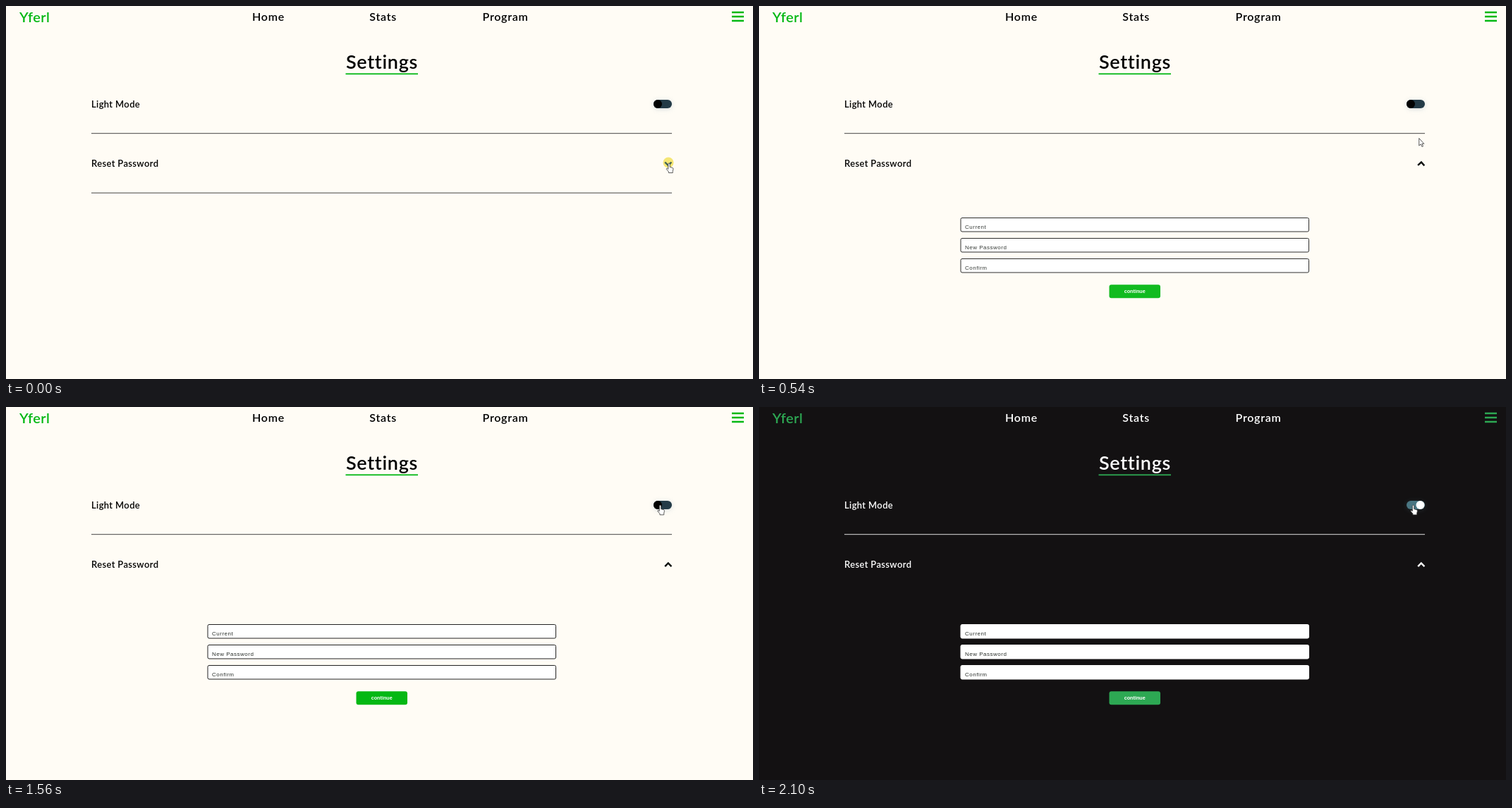
Write an HTML page that moves like this. It is 1059 px wide and 529 px high and loops after 3.48 s.

```html
<!DOCTYPE html>
<html lang="en">
<head>
<meta charset="utf-8">
<title>Settings</title>
<style>
  html, body { margin: 0; width: 100%; height: 100%; overflow: hidden; }
  svg {
    --bg: #fffcf5; --ink: #000; --accent: #04b814; --line: #444; --border: #222;
    display: block; width: 1059px; height: 529px; background: var(--bg);
    font: 600 13px Lato, sans-serif; letter-spacing: .35px;
  }
  svg.dark {
    --bg: #131112; --ink: #fff; --accent: #2da853; --line: #ddd; --border: #fff;
  }
  text { fill: var(--ink); white-space: pre; }
  .nav { font-size: 16px; letter-spacing: .75px; }
  .title { font-size: 27px; letter-spacing: .7px; }
  #logo { font-size: 20px; }
  .accent { fill: var(--accent); }
  .line { stroke: var(--line); }
  .field rect { fill: #fff; stroke: var(--border); }
  .field text { font: 8px "Liberation Sans", Arial, sans-serif; letter-spacing: .5px; fill: #2b302c; }
  .button { font: bold 7.2px "Liberation Sans", Arial, sans-serif; letter-spacing: 0; fill: #fff; }
  #chevron { fill: none; stroke-width: 2.4; }
  #cursor path { fill: #fff; stroke: #333; stroke-width: .8; stroke-linejoin: round; }
</style>
</head>
<body>
<svg id="stage" viewBox="0 0 1059 529">
  <defs><filter id="blur" x="-50%" y="-100%" width="200%" height="300%"><feGaussianBlur stdDeviation="3.5"/></filter></defs>

  <text id="logo" x="19" y="23">Yferl</text>
  <g class="nav">
    <text x="349" y="20.5">Home</text>
    <text x="515.3" y="20.5">Stats</text>
    <text x="675.5" y="20.5">Program</text>
  </g>
  <path class="accent" d="M1029 7.8h17v2.4h-17zm0 6h17v2.4h-17zm0 6h17v2.4h-17z"/>

  <text class="title" x="482" y="89">Settings</text>
  <rect class="accent" x="481.5" y="95.4" width="102.5" height="1.8"/>

  <text x="121" y="144">Light Mode</text>
  <path class="line" d="M121 180.7H944"/>
  <text x="121" y="228">Reset Password</text>
  <path id="lowerLine" class="line" d="M121 265.1H944"/>

  <rect id="glow" x="918" y="134" width="26" height="12" rx="6" filter="url(#blur)"/>
  <rect id="track" x="918" y="133" width="26" height="12" rx="6"/>
  <circle id="knob" cy="139" r="6"/>

  <g id="form">
    <g id="fields"></g>
    <rect class="accent" x="496.5" y="403.3" width="72.5" height="19" rx="3"/>
    <text class="button" x="532.7" y="415.2" text-anchor="middle">continue</text>
  </g>

  <circle id="click" cx="-1" cy="-1" r="7.5" fill="#f2df4a" opacity=".75"/>
  <path id="chevron" d="M-4.6 -2.3L0 2.3L4.6 -2.3"/>
  <g id="cursor">
    <path id="arrow" d="M0 0V10.5L2.4 8.4L4.2 12L5.8 11.3L4.1 7.8H7.1Z"/>
    <path id="hand" d="M-1.2 1.2a1.2 1.2 0 012.4 0V5.4L4.8 6.4q1.3.4 1.1 1.8L5.2 11.5V13.6H-.6V12L-3.6 8.6q-.3-1.5 1-1.4L-1.2 8.4Z"/>
  </g>
</svg>
<script>
const LOOP = 3480, OPEN_AT = 110, DARK_AT = 1610;
const $ = id => document.getElementById(id);

$('fields').innerHTML = ['Current', 'New Password', 'Confirm'].map((label, i) => `
  <g class="field" transform="translate(286 ${Math.round(308 + i * 28.8)})">
    <rect x="0" y=".5" width="493.5" height="19.5" rx="2"/>
    <text x="6" y="15.5">${label}</text>
  </g>`).join('');

// time, x, y of the pointer tip
const pointerPath = [
  [0, 940, 223], [300, 939.5, 221], [420, 938.5, 209], [660, 933, 166.5],
  [780, 931, 156], [1030, 929, 145], [1190, 929, 145], [1260, 927.5, 139.3],
];

const phase = (t, start, length) => Math.min(1, Math.max(0, (t - start) / length));
const mix = (a, b, p) => a + (b - a) * p;
const smooth = p => p * p * (3 - 2 * p);
const easeOut = p => 1 - (1 - p) ** 2;
const mixColor = (a, b, p) => `rgb(${a.map((v, i) => Math.round(mix(v, b[i], p)))})`;
const show = (id, on) => $(id).setAttribute('visibility', on ? 'visible' : 'hidden');

function pointerAt(t) {
  const next = pointerPath.findIndex(key => key[0] > t);
  if (next < 0) return pointerPath.at(-1).slice(1);
  const [t0, x0, y0] = pointerPath[next - 1], [t1, x1, y1] = pointerPath[next];
  const p = (t - t0) / (t1 - t0);
  return [mix(x0, x1, p), mix(y0, y1, p)];
}

function drawForm(t) {
  const progress = phase(t, OPEN_AT, 500), open = smooth(progress);
  $('form').setAttribute('transform', `translate(0 ${Math.round(-161 * (1 - open))})`);
  $('form').setAttribute('opacity', open);
  show('lowerLine', t < OPEN_AT);

  $('chevron').setAttribute('transform', `translate(938.8 223.8) rotate(${-180 * easeOut(progress)})`);
  const hover = 1 - phase(t, 420, 120);
  $('chevron').style.stroke = t < DARK_AT ? mixColor([8, 12, 10], [62, 98, 82], hover) : '#fff';
}

function drawToggle(t) {
  const dark = t >= DARK_AT, p = smooth(phase(t, DARK_AT, 490));
  $('knob').setAttribute('cx', mix(924, 937.5, p));
  $('knob').style.fill = dark ? mixColor([18, 17, 20], [255, 255, 255], p) : '#030303';
  $('track').style.fill = dark ? mixColor([40, 72, 80], [74, 118, 130], p) : '#243b47';
  $('glow').style.fill = dark ? '#426b74' : '#9aaebd';
  $('glow').setAttribute('opacity', dark ? .3 : .4);
}

function drawPointer(t) {
  const [x, y] = pointerAt(t);
  for (const id of ['cursor', 'click']) $(id).setAttribute('transform', `translate(${x} ${y})`);
  const overControl = y > 215 || y < 147;
  show('hand', overControl);
  show('arrow', !overControl);
  show('click', t < 90 || (t >= 1430 && t < 1540));
}

function frame(now) {
  const t = now % LOOP;
  $('stage').classList.toggle('dark', t >= DARK_AT);
  $('logo').style.fill = mixColor([4, 184, 20], [45, 168, 83], phase(t, DARK_AT, 310));
  drawForm(t);
  drawToggle(t);
  drawPointer(t);
  requestAnimationFrame(frame);
}
frame(0);
</script>
</body>
</html>
```
